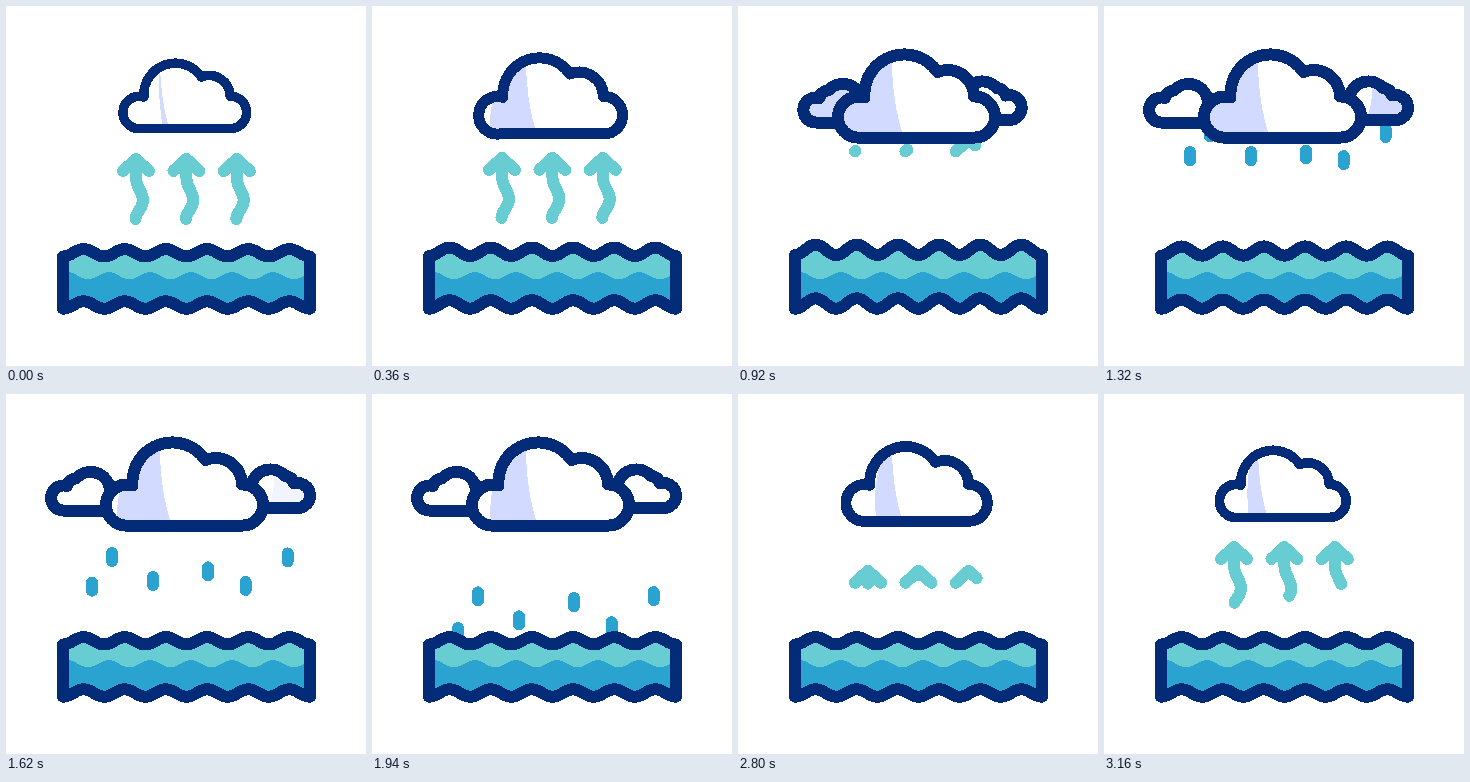
An HTML page that plays this animation: 360x360 px, repeating every 3.18 s.

```html
<!DOCTYPE html>
<html lang="en">
<head>
<meta charset="utf-8">
<title>Water cycle</title>
<style>
  html, body { margin: 0; width: 100%; height: 100%; overflow: hidden; background: #fff; }
  svg { display: block; width: 100vw; height: 100vh; shape-rendering: crispEdges; }
  .line, .arrow, .drop { fill: none; stroke-width: 12; stroke-linejoin: round; stroke-linecap: round; }
  .line { stroke: #032b78; vector-effect: non-scaling-stroke; }
  .arrow { stroke: #67cdd3; }
  .drop { stroke: #2aa3d0; }
  .shade { fill: #d3daff; }
</style>
</head>
<body>
<svg viewBox="0 0 360 360">
  <defs>
    <path id="big" d="M237 131.5A20.5 20.5 0 0 0 236 90.5A26.5 26.5 0 0 0 199.5 66A40 40 0 0 0 126.5 91.5A20.5 20.5 0 1 0 122.5 131.5Z"/>
    <path id="small" d="M110 116.5H57.5A12.5 12.5 0 1 1 61 92A9.5 9.5 0 0 1 70 84.5A19.5 19.5 0 0 1 104 96L110 100Z"/>
    <clipPath id="bigClip"><use id="bigMask" href="#big"/></clipPath>
    <clipPath id="smallClip"><use href="#small"/></clipPath>
    <clipPath id="below"><rect y="114" width="360" height="200"/></clipPath>
  </defs>
  <g id="arrows"></g>
  <g id="rain" clip-path="url(#below)"></g>
  <g id="left">
    <use href="#small" fill="#fff"/>
    <use id="leftShade" href="#small" class="shade"/>
    <use href="#small" class="line"/>
  </g>
  <g id="right">
    <use href="#small" fill="#fff"/>
    <g clip-path="url(#smallClip)">
      <path id="rightShade" class="shade" d="M40 70H84Q76 88 88 120H40Z"/>
    </g>
    <use href="#small" class="line"/>
  </g>
  <use id="bigFill" href="#big" fill="#fff"/>
  <g clip-path="url(#bigClip)"><path id="shade" class="shade"/></g>
  <use id="bigLine" href="#big" class="line"/>
  <path id="shallow" fill="#67cdd3"/>
  <path id="deep" fill="#2aa3d0"/>
  <path id="rim" class="line"/>
</svg>
<script>
const LOOP = 3180;
const $ = id => document.getElementById(id);
const span = (t, start, length) => Math.min(1, Math.max(0, (t - start) / length));
const easeOut = u => 1 - (1 - u) ** 2;
const smooth = u => u * u * (3 - 2 * u);

function add(parent, tag, attrs) {
  const el = document.createElementNS('http://www.w3.org/2000/svg', tag);
  for (const k in attrs) el.setAttribute(k, attrs[k]);
  return parent.appendChild(el);
}

// Delays of each arrow when it leaves and when it comes back.
const arrows = [[0, 0], [28, 65], [146, 160]].map(([out, back], i) => {
  const g = add($('arrows'), 'g', {});
  const part = d => add(g, 'path', { d, class: 'arrow', pathLength: 1 });
  return {
    out, back, g, x: i * 50.4,
    shaft: part('M130 153V172C130 182 137 186 137 194C137 203 130 205 129.5 213'),
    head: part('M117 165L130 153L143 165')
  };
});

// x, height at 1320 ms, speed in px per ms
const drops = [
  [86, 150, .142], [106, 126, .123], [147, 150, .123],
  [202, 148.5, .096], [239.7, 154, .126], [281.7, 127, .121]
].map(([x, y, v]) => ({ x, y, v, el: add($('rain'), 'path', { class: 'drop' }) }));

function wave(y, amp, phase = 0) {
  return Array.from({ length: 121 }, (_, i) => {
    const u = i / 120;
    return (57 + 247 * u).toFixed(2) + ' ' + (y + amp * Math.cos(u * 12 * Math.PI + phase)).toFixed(2);
  });
}

function drawWater(t) {
  const swell = Math.sin(Math.PI * span(t, 200, 1400));
  const amp = 3.7 + 1.5 * swell;
  const top = wave(246.8 - 3 * swell, amp);
  const bottom = wave(299 - 1.5 * swell, amp).reverse();
  const area = line => `M${line.concat(bottom).join('L')}Z`;
  $('rim').setAttribute('d', area(top));
  $('shallow').setAttribute('d', area(top));
  $('deep').setAttribute('d', area(wave(269.7, 3.6, 2.45)));
}

function trim(el, f) {
  el.style.display = f > 0 ? '' : 'none';
  el.setAttribute('stroke-dasharray', f >= 1 ? 'none' : f + ' 3');
}

function drawArrows(t) {
  const leaving = t < 1600;
  const y = leaving ? -21 * smooth(span(t, 250, 800)) : 68 * (1 - smooth(span(t, 2380, 700)));
  for (const a of arrows) {
    a.g.setAttribute('transform', `translate(${a.x} ${y})`);
    trim(a.head, leaving ? 1 - easeOut(span(t, 748 + a.out, 200)) : span(t, 2400 + a.back, 300));
    trim(a.shaft, leaving ? 1 - span(t, 400 + a.out, 348) : span(t, 2700 + a.back, 495));
  }
}

function drawRain(t) {
  for (const d of drops) {
    const y = d.y + d.v * (t - 1320);
    d.el.style.display = t > 1000 && y < 270 ? '' : 'none';
    d.el.setAttribute('d', `M${d.x} ${y - 4}V${y + 4}`);
  }
}

function drawBigCloud(t) {
  const scale = .787 + .213 * (easeOut(span(t, 200, 430)) - span(t, 2420, 820));
  const zoom = `translate(180 89.5) scale(${scale}) translate(-180 -89.5)`;
  for (const id of ['bigFill', 'bigMask', 'bigLine']) $(id).setAttribute('transform', zoom);

  const spread = 60 * easeOut(span(t, 200, 400)) * (1 - .8 * span(t, 1000, 2100));
  $('shade').setAttribute('d',
    `M154 45Q${150 - spread} 80 ${158 - spread} 132H166Q153 94 154 45Z`);
}

function drawSideClouds(t) {
  const tuck = 75 * (1 - easeOut(span(t, 600, 670)) + span(t, 2214, 366) ** 2);
  $('left').setAttribute('transform', `translate(${tuck} 0)`);
  $('right').setAttribute('transform', `translate(${349 - tuck} -2.5) scale(-1 1)`);
  for (const id of ['left', 'right']) $(id).style.display = tuck < 75 ? '' : 'none';
  $('leftShade').setAttribute('opacity', span(tuck, 0, 20));
  $('rightShade').setAttribute('opacity', 1 - span(Math.abs(t - 1320), 100, 300));
}

const start = performance.now();
function tick() {
  const t = (performance.now() - start) % LOOP;
  drawBigCloud(t);
  drawSideClouds(t);
  drawArrows(t);
  drawRain(t);
  drawWater(t);
  requestAnimationFrame(tick);
}
tick();
</script>
</body>
</html>
```
